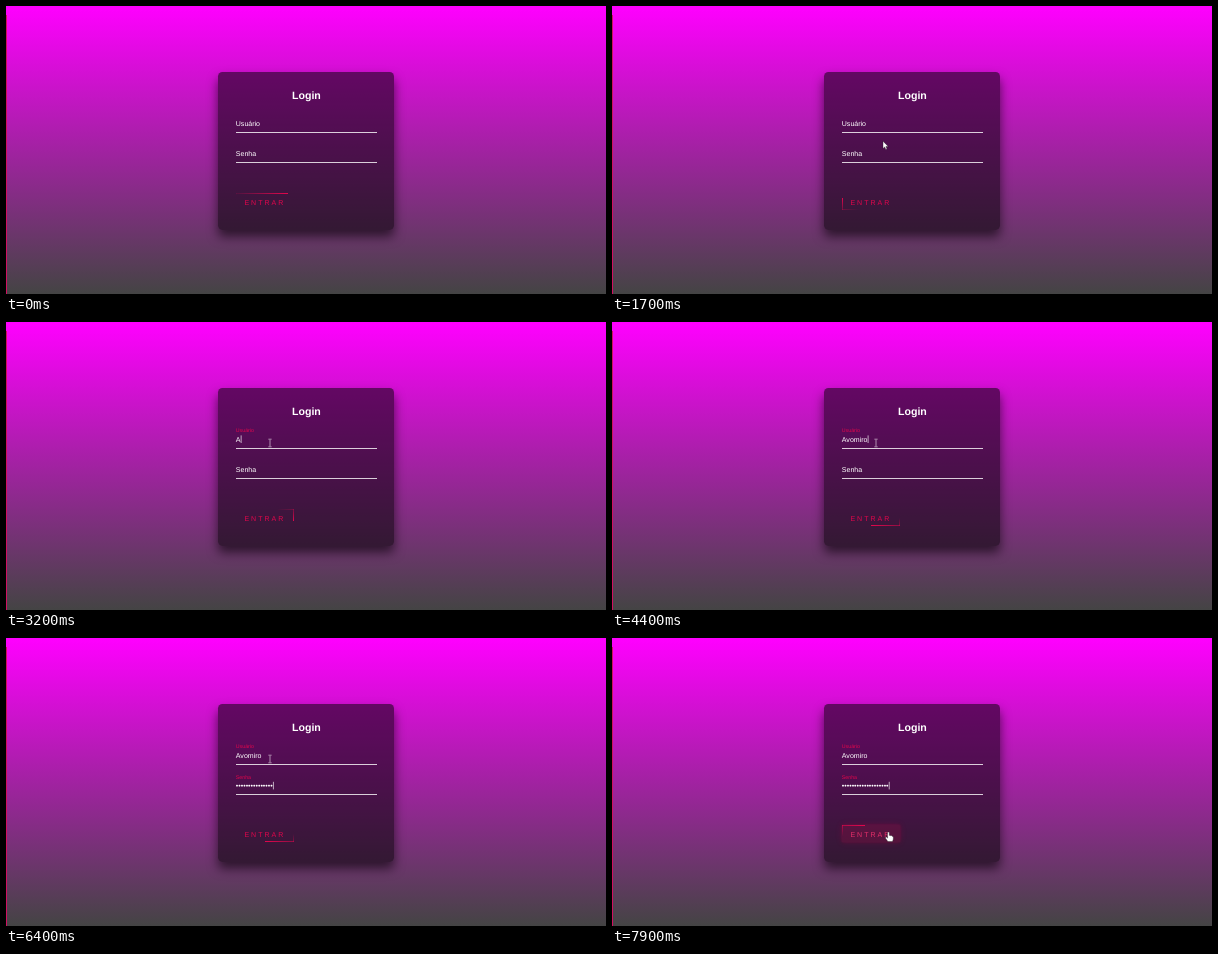
An HTML page for the animation above (8000 ms loop, 600 by 288 pixels).

```html
<!DOCTYPE html>
<html lang="pt">
<head>
<meta charset="utf-8">
<title>Login</title>
<style>
  html, body { margin: 0; width: 100%; height: 100%; overflow: hidden; }
  body { position: relative; background: linear-gradient(#f0f, #444); }
  .edge { position: absolute; left: 0; top: 9px; width: 1px; bottom: 0; background: #d01060; }
  .card {
    position: absolute; left: 212px; top: 66px; width: 176px; height: 158px;
    border-radius: 4.4px; background: rgba(0, 0, 0, .53);
    box-shadow: 0 6.6px 11px rgba(0, 0, 0, .6);
  }
  .button {
    position: absolute; left: 229.6px; top: 187.3px; width: 58.5px; height: 17px;
    overflow: hidden;
  }
  .button i { position: absolute; }
  .h { width: 100%; height: 1px; }
  .v { width: 1px; height: 100%; }
  svg { position: absolute; left: 0; top: 0; }
  text {
    font: 7.04px "Liberation Sans", Arial, sans-serif; fill: #fff;
    text-rendering: geometricPrecision; white-space: pre;
  }
  #title { font-size: 10.6px; font-weight: bold; text-anchor: middle; }
  #enter { letter-spacing: 2px; }
</style>
</head>
<body>
<div class="edge"></div>
<div class="card"></div>
<div class="button" id="button">
  <i class="h"></i><i class="v"></i><i class="h"></i><i class="v"></i>
</div>
<svg width="600" height="288" viewBox="0 0 600 288">
  <text id="title" x="300.4" y="93.4">Login</text>
  <text id="userLabel" x="229.8">Usuário</text>
  <text id="passLabel" x="229.8">Senha</text>
  <text id="user" x="229.8" y="119.9"></text>
  <text id="pass" x="229.8" y="150.3"></text>
  <g fill="#fff" fill-opacity=".8">
    <rect x="230" y="126" width="141" height="1"/>
    <rect x="230" y="156" width="141" height="1"/>
    <rect id="caret" width=".8" height="7.6"/>
  </g>
  <text id="enter" x="238.4" y="198.5">ENTRAR</text>
  <g id="arrow">
    <path d="M0 0V7.4L1.7 5.8L2.8 8.3L4 7.8L2.9 5.3H5.2Z" fill="#fff" stroke="#222" stroke-width=".4"/>
  </g>
  <g id="beam">
    <path d="M-1.6-3.8H-.5L0-3.4L.5-3.8H1.6M0-3.4V3.4M-1.6 3.8H-.5L0 3.4L.5 3.8H1.6"
      fill="none" stroke="#d8c8d8" stroke-width=".7"/>
  </g>
  <g id="hand">
    <path d="M-.9 .6Q0-.6 .8 .6V3.4Q1.8 2.9 2.2 3.7Q3.2 3.3 3.6 4.2Q4.8 4 4.8 5.2V7.2L4 9.6H-.6L-3 6.2Q-3.2 4.9-2 5.1L-.9 6.1Z"
      fill="#fff" stroke="#222" stroke-width=".4"/>
  </g>
</svg>
<script>
  const LOOP = 8000, STEP = 100;
  const RED = [226, 6, 76], WHITE = [255, 255, 255];
  const USER = "Avomiro";
  const TYPE_USER = [3100, 3300, 3500, 3700, 3900, 4000, 4200];
  const TYPE_PASS = Array.from({ length: 19 }, (_, i) => 5000 + i * 100);
  const FOCUS_USER = 2100, FOCUS_PASS = 4700, HOVER = 7830;
  // time, x, y
  const MOUSE = [
    [500, 345, 292], [800, 316, 222], [1000, 307, 210], [1200, 306, 206],
    [1800, 264, 121], [7200, 264, 121], [7800, 276, 190], [7900, 276.5, 194]
  ];

  const el = id => document.getElementById(id);
  const button = el("button"), caret = el("caret"), bars = button.children;
  const mix = (a, b, p) => a + (b - a) * p;
  const clamp = v => Math.min(1, Math.max(0, v));
  const rgb = (a, b, p) => `rgb(${a.map((v, i) => mix(v, b[i], p))})`;

  // CSS "ease" curve, solved by bisection
  function ease(x) {
    x = clamp(x);
    let lo = 0, hi = 1;
    for (let i = 0; i < 20; i++) {
      const s = (lo + hi) / 2, r = 1 - s;
      if (3 * r * r * s * .25 + 3 * r * s * s * .25 + s ** 3 < x) lo = s; else hi = s;
    }
    const r = 1 - lo;
    return 3 * r * r * lo * .1 + 3 * r * lo * lo + lo ** 3;
  }

  const sides = [["left", 90], ["top", 180], ["right", 270], ["bottom", 0]];
  const anchors = ["top", "right", "bottom", "left"];
  sides.forEach(([, angle], i) => {
    bars[i].style[anchors[i]] = 0;
    bars[i].style.background = `linear-gradient(${angle}deg, rgba(${RED}, 0), rgb(${RED}))`;
  });

  function drawBorder(t) {
    const phase = t / 1000 + (t < 7200 ? .225 : .2);
    sides.forEach(([side], i) => {
      const local = (phase - i * .25 + 1) % 1;
      bars[i].style[side] = mix(-100, 100, clamp(local * 2)) + "%";
    });
  }

  function drawLabel(id, t, start, base) {
    const p = ease((t - start) / 500), s = el(id);
    s.setAttribute("y", mix(base, base - 9.8, p));
    s.style.fontSize = mix(7.04, 5.27, p) + "px";
    s.style.fill = rgb(WHITE, RED, p);
  }

  function drawTyping(t) {
    const count = times => times.filter(v => v <= t).length;
    const nUser = count(TYPE_USER), nPass = count(TYPE_PASS);
    el("user").textContent = USER.slice(0, nUser);
    el("pass").textContent = "•".repeat(nPass);

    const onPass = t >= FOCUS_PASS;
    const field = el(onPass ? "pass" : "user");
    const lastKey = onPass ? TYPE_PASS[nPass - 1] : TYPE_USER[nUser - 1];
    const since = t - (lastKey || (onPass ? FOCUS_PASS : FOCUS_USER));
    caret.setAttribute("x", 230 + field.getComputedTextLength());
    caret.setAttribute("y", onPass ? 143.8 : 113.4);
    caret.style.display = since >= 0 && since % 1000 < 500 ? "" : "none";
  }

  function drawMouse(t) {
    let i = 0;
    while (i < MOUSE.length - 2 && t > MOUSE[i + 1][0]) i++;
    const [t0, x0, y0] = MOUSE[i], [t1, x1, y1] = MOUSE[i + 1];
    const p = clamp((t - t0) / (t1 - t0));
    const x = mix(x0, x1, p), y = mix(y0, y1, p);
    const onField = (y > 112 && y < 127) || (y > 142 && y < 157);
    const onButton = x < 288 && y > 187 && y < 204.5;
    const kind = onButton ? "hand" : onField ? "beam" : "arrow";
    for (const id of ["arrow", "beam", "hand"]) {
      el(id).style.display = id === kind && t >= MOUSE[0][0] ? "" : "none";
      el(id).setAttribute("transform", `translate(${x} ${y})`);
    }
  }

  function drawHover(t) {
    const p = ease((t - HOVER) / 500);
    button.style.background = `rgba(${RED}, ${p})`;
    button.style.borderRadius = 2.2 * p + "px";
    button.style.boxShadow = [2.2, 11, 22, 44]
      .map(r => `0 0 ${r * p}px rgba(${RED}, ${p})`).join();
    el("enter").style.fill = rgb(RED, WHITE, p);
  }

  function draw() {
    const t = Math.floor(performance.now() % LOOP / STEP) * STEP;
    drawBorder(t);
    drawLabel("userLabel", t, FOCUS_USER, 119.9);
    drawLabel("passLabel", t, FOCUS_PASS, 150.3);
    drawTyping(t);
    drawMouse(t);
    drawHover(t);
    requestAnimationFrame(draw);
  }
  draw();
</script>
</body>
</html>
```
